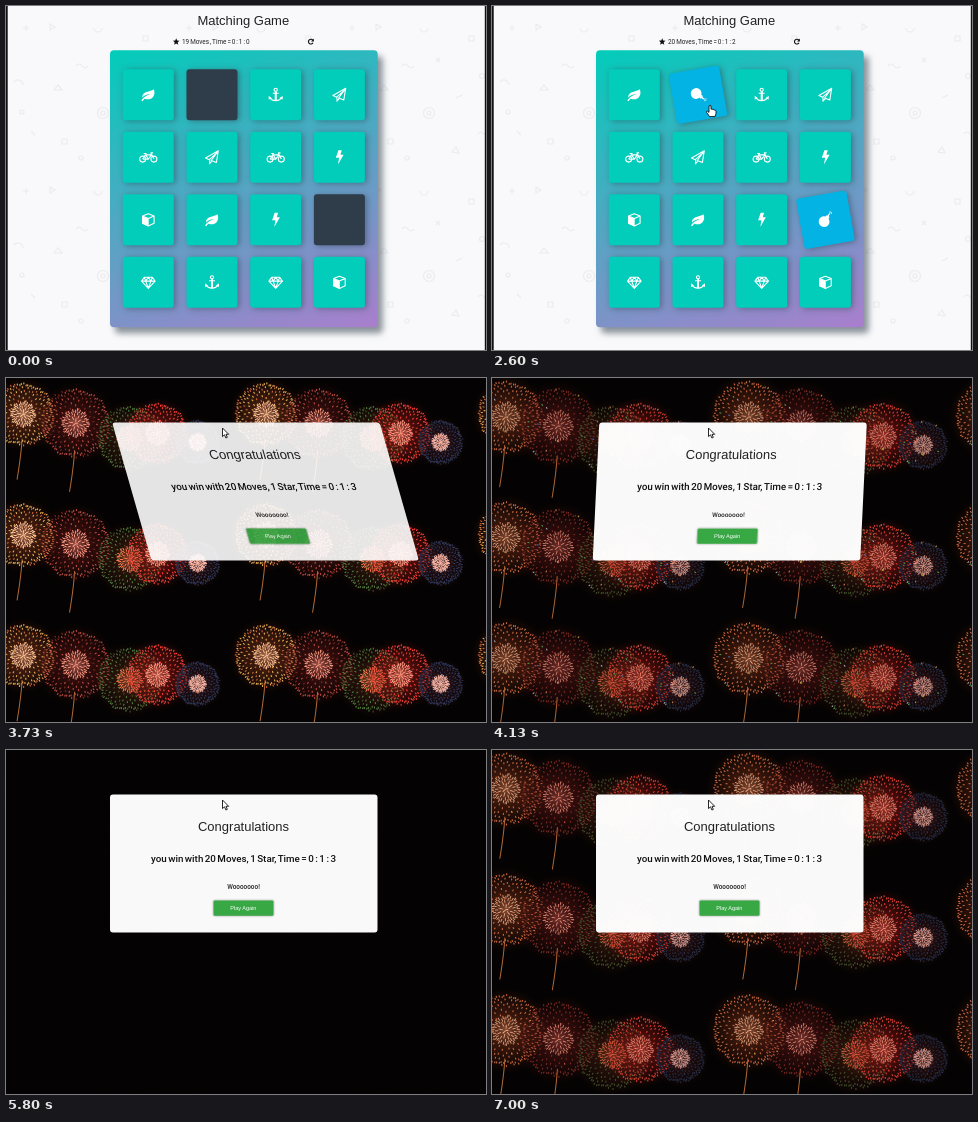
Write an HTML page with a canvas that moves like this. It is 480x344 px and loops after 7.07 s.

```html
<!DOCTYPE html>
<html lang="en">
<head>
<meta charset="utf-8">
<title>Matching Game</title>
<style>
html, body { margin: 0; width: 100%; height: 100%; overflow: hidden; background: #000; }
canvas, svg { position: absolute; left: 0; top: 0; width: 480px; height: 344px; }
.arial { font-family: "Liberation Sans", Arial, sans-serif; }
.ui { font-family: Roboto, sans-serif; word-spacing: -.1em; }
.deck { filter: drop-shadow(5px 6px 3px rgba(46,61,73,.55)); }
.card { filter: drop-shadow(2px 1px 3px rgba(46,61,73,.5)); }
.line { fill: none; stroke: #fff; stroke-width: 1.1; stroke-linejoin: round; }
</style>
</head>
<body>
<canvas id="sky" width="480" height="344"></canvas>
<svg viewBox="0 0 480 344">
  <defs>
    <linearGradient id="deckFill" gradientUnits="userSpaceOnUse" x1="178" y1="18" x2="298" y2="348">
      <stop stop-color="#02ccba"/><stop offset="1" stop-color="#aa7ecd"/>
    </linearGradient>
    <pattern id="paper" width="163" height="163" patternUnits="userSpaceOnUse">
      <rect width="163" height="163" fill="#f9f9fb"/>
      <g fill="none" stroke="#ececf0" stroke-width="1.2">
        <circle cx="97" cy="107" r="5.5"/><circle cx="97" cy="107" r="2"/>
        <path d="M17 22h6m-3-3v6M44 18l5 3-5 3zM8 76a5 5 0 0 1 9 3M48 84l4-5 4 5zM70 60q3-4 6 0t6 0M25 125l4 4M56 133h5v5h-5zM88 22a4 4 0 0 0 8 0M104 52l4 4m0-4l-4 4M124 92l6-3M137 30h5v5h-5zM146 128q3-4 6 0t6 0M120 146l4-5 3 6z"/>
        <circle cx="16" cy="106" r="2"/><circle cx="75" cy="152" r="2"/><circle cx="150" cy="70" r="2.5"/>
      </g>
    </pattern>
  </defs>
  <g id="game">
    <rect width="480" height="344" fill="url(#paper)"/>
    <path d="M0 0H1.7V344H0zM478.8 0H480V344H478.8z" fill="#111"/>
    <text class="arial" x="237.3" y="19.3" font-size="13" text-anchor="middle" fill="#222">Matching Game</text>
    <path id="star" fill="#111"/>
    <text id="status" class="ui" x="176" y="38.2" font-size="6.4" fill="#222"></text>
    <path d="M306.8 34.2A2.4 2.4 0 1 0 307 36.8" fill="none" stroke="#111" stroke-width="1.1"/>
    <path d="M307.9 32.6V35.4H305z" fill="#111"/>
    <rect class="deck" x="104" y="44.3" width="267.7" height="277" rx="4" fill="url(#deckFill)"/>
    <g id="cards"></g>
  </g>
  <g id="modal">
    <rect x="104" y="44.5" width="267.5" height="138" rx="3" fill="#fff" fill-opacity=".975"/>
    <g text-anchor="middle" fill="#222">
      <text class="arial" x="237.5" y="81.3" font-size="13">Congratulations</text>
      <text class="ui" x="237.5" y="111.8" font-size="9.8" font-weight="500" fill="#111">you win with 20 Moves, 1 Star, Time = 0 : 1 : 3</text>
      <text class="ui" x="237.5" y="139" font-size="6.4" font-weight="500">Wooooooo!</text>
      <rect x="207.5" y="150.5" width="60" height="15.3" rx="1" fill="#38a845" style="filter:drop-shadow(0 0 1px #0006)"/>
      <text class="arial" x="237.3" y="160.2" font-size="5.5" fill="#fff">Play Again</text>
    </g>
  </g>
  <g id="cursor" stroke="#111" stroke-width=".9" stroke-linejoin="round" fill="#fff">
    <path id="arrow" d="M0 0V8.6L2 6.8L3.4 10L4.8 9.4L3.5 6.3H6.2z"/>
    <path id="hand" d="M-1 1Q0-.6 1 1V4.2Q2.2 3.6 2.8 4.6Q4 4 4.5 5.1Q6 4.8 6 6.3V8.6L5 11.6H-.4L-3.4 7.4Q-3.8 5.8-2.4 6.2L-1 7.4z"/>
  </g>
</svg>
<script>
const LOOP = 7070, FIRST_CLICK = 1520, SECOND_CLICK = 2200, MATCHED = 3050, WIN = 3270;
const TEAL = '#02ccba', BLUE = '#02b3e4', DARK = '#2e3d49';
const $ = id => document.getElementById(id);
const clamp = (v, lo = 0, hi = 1) => Math.min(hi, Math.max(lo, v));
const mix = (a, b, k) => a + (b - a) * k;

// CSS-like cubic bezier easing
function bezier(x1, y1, x2, y2) {
  const at = (a, b, s) => 3 * a * s * (1 - s) ** 2 + 3 * b * s * s * (1 - s) + s ** 3;
  return x => {
    let lo = 0, hi = 1;
    for (let i = 0; i < 20; i++) {
      const s = (lo + hi) / 2;
      if (at(x1, x2, s) < x) lo = s; else hi = s;
    }
    return at(y1, y2, lo);
  };
}
const ease = bezier(.25, .1, .25, 1), easeOut = bezier(0, 0, .58, 1), easeInOut = bezier(.42, 0, .58, 1);

// Interpolate rows of [time, ...values]
function track(keys, t, easing) {
  if (t <= keys[0][0]) return keys[0].slice(1);
  for (let i = 1; i < keys.length; i++) {
    const [a, b] = [keys[i - 1], keys[i]];
    if (t < b[0]) {
      const k = easing((t - a[0]) / (b[0] - a[0]));
      return a.slice(1).map((v, j) => mix(v, b[j + 1], k));
    }
  }
  return keys[keys.length - 1].slice(1);
}

// ---- Board ----
const solid = d => `<path d="${d}" fill="#fff"/>`;
const line = d => `<path d="${d}" class="line"/>`;
const ICONS = {
  leaf: solid('M-7 5.6Q-4 1 2.5-.8Q-3-.4-6 2.6C-6.5-3.6 2-2.8 5.4-5.6C8 0 4 6.4-3.8 4L-5.8 6.4z'),
  bolt: solid('M-1-7H2.4L1-2.6H4.2L-1.4 7.2L-.3 .5H-3.6z'),
  anchor: '<circle cy="-5" r="1.6" class="line"/>' + line('M-3-1.6H3M0-3.4V6M-5.6 2.4C-4.5 7 4.5 7 5.6 2.4') +
    solid('M-1-3H1V6H-1zM-7 4.6V1L-3.8 3.6zM7 4.6V1L3.8 3.6z'),
  plane: line('M6.3-6.6L-6.5 .7L-2.7 2.4L5-4.6L-.8 3.2L4.4 5.2zM-2.4 2.6V6.4L-.2 3.8'),
  bike: '<circle cx="-5.6" cy="1.8" r="3" class="line"/><circle cx="5.6" cy="1.8" r="3" class="line"/>' +
    line('M-5.6 1.8L-2.8-2.4H3.2L0 1.8H-5.6M-3.2-3.6L0 1.8M5.6 1.8L2.6-4.4H4.8M-4.6-3.8H-1.8'),
  cube: line('M0-6L5.8-3.8V3.4L0 6.2L-5.8 3.4V-3.8zM-5.8-3.8L0-1.2L5.8-3.8') + solid('M-6-3.6L.4-1V6.4L-6 3.6z'),
  gem: line('M-4-5H4L6.8-1.2L0 6L-6.8-1.2zM-6.8-1.2H6.8M-4-5L-2.6-1.2L0 6L2.6-1.2L4-5M-2.6-1.2L0-5L2.6-1.2'),
  bomb: '<circle cx="-1.6" cy="1.6" r="5.4" fill="#fff"/>' + line('M3-2.4Q4-5 5.8-5.4M5.6-7.4V-6.6M7.6-5.4H6.8M7-7L6.6-6.4') +
    solid('M.6-3L2.4-4.4L4.6-2L3-.4z')
};
const LAYOUT = ('leaf bomb anchor plane bike plane bike bolt ' +
  'cube leaf bolt bomb gem anchor gem cube').split(' ');
const cardPos = i => [142.3 + 63.7 * (i % 4), 88.8 + 62.5 * Math.floor(i / 4)];

$('cards').innerHTML = LAYOUT.map((name, i) => {
  const flip = i === 1 ? ' transform="scale(1 -1)"' : '';
  return `<g class="card" transform="translate(${cardPos(i)})"><g>
    <rect x="-25.5" y="-25.5" width="51" height="51" rx="3" fill="${TEAL}"/>
    <g class="icon"${flip}>${ICONS[name]}</g></g></g>`;
}).join('');

$('star').setAttribute('d', 'M' + Array.from({ length: 10 }, (_, i) => {
  const r = i % 2 ? 1.6 : 3.5, a = i * Math.PI / 5;
  return [170.2 + r * Math.sin(a), 35.8 - r * Math.cos(a)].map(v => v.toFixed(2));
}).join('L') + 'z');

const pair = [[1, SECOND_CLICK], [11, FIRST_CLICK]].map(([i, opened]) => {
  const body = $('cards').children[i].firstElementChild;
  return { body, opened, face: body.querySelector('rect'), icon: body.querySelector('.icon') };
});
const SWING = [[0, 0], [.2, 15], [.4, -10], [.6, 5], [.8, -5], [1, 0]];

function drawBoard(t) {
  const seconds = Math.floor((t + 300) / 1000);
  $('status').textContent = `${t < SECOND_CLICK ? 19 : 20} Moves , Time = 0 : 1 : ${seconds}`;
  const [angle] = track(SWING, (t - SECOND_CLICK) / 1000, ease);
  for (const { body, face, icon, opened } of pair) {
    const open = t >= opened;
    face.setAttribute('fill', !open ? DARK : t < MATCHED ? BLUE : TEAL);
    icon.style.display = open ? '' : 'none';
    body.setAttribute('transform', `rotate(${angle})`);
  }
}

// ---- Cursor ----
const PATH = [[90, 484, 350], [800, 388, 262], [1200, 364, 234], [1450, 341, 216], [1600, 341, 216],
  [2120, 218, 99], [2800, 218, 99], [3250, 216.5, 50]];

function drawCursor(t) {
  const [x, y] = track(PATH, t, easeInOut);
  const overCard = t < WIN && LAYOUT.some((_, i) => {
    const [cx, cy] = cardPos(i);
    return Math.abs(x - cx) < 25.5 && Math.abs(y - cy) < 25.5;
  });
  $('cursor').setAttribute('transform', `translate(${x} ${y})`);
  $('hand').style.display = overCard ? '' : 'none';
  $('arrow').style.display = overCard ? 'none' : '';
}

// ---- Win dialog: slides in skewed, then settles ----
const ENTER = [[0, 267.5, -30, 0], [.6, 0, 20, 1], [.8, 0, -5, 1], [1, 0, 0, 1]];

function drawModal(t) {
  const [dx, skew, opacity] = track(ENTER, (t - WIN) / 1000, easeOut);
  const modal = $('modal');
  modal.setAttribute('transform', `translate(${237.5 + dx} 113.5) skewX(${skew}) translate(-237.5 -113.5)`);
  modal.setAttribute('opacity', opacity);
}

// ---- Fireworks ----
const SHOW = 2900, TILE_W = 243, TILE_H = 120.8, PAD = 50;
const BURSTS = [
  { x: 23.5, y: 33, r: 38, lead: 158, fresh: '#e0a850', aged: '#c0623a', core: '#ffc8a0', glow: '#90381a', stem: true },
  { x: 76, y: 42, r: 39, lead: 300, fresh: '#b84a40', aged: '#74261e', core: '#ffa088', glow: '#701a18', stem: true },
  { x: 130, y: 57, r: 36, lead: 300, fresh: '#4c7c3c', aged: '#3c4c26', core: '#ff7c50', glow: '#5c2414' },
  { x: 158, y: 52, r: 34, lead: 300, fresh: '#f83c34', aged: '#cc3a2e', core: '#ffa088', glow: '#b81c18' },
  { x: 198, y: 61, r: 25, lead: 300, fresh: '#2c3658', aged: '#20283e', core: '#ffb8a4', glow: '#501c20' }
];
const EMBERS = ['#c04030', '#b09038', '#4060b0', '#4c9048', '#c07848', '#9a9aa8'];
const noise = n => { const v = Math.sin(n * 127.1 + 3.7) * 43758.5453; return v - Math.floor(v); };

const sky = $('sky').getContext('2d');
const tile = document.createElement('canvas');
tile.width = (TILE_W + 2 * PAD) * 2;
tile.height = 440;
const tc = tile.getContext('2d');

function spokes(radius, count, length, colorOf) {
  for (let i = 0; i < count; i++) {
    // evenly spread points on a sphere, seen from the front
    const z = 1 - (i + .5) / count;
    const d = radius * Math.sqrt(1 - z * z) * mix(.96, 1.04, noise(i));
    const a = i * 2.39996, c = Math.cos(a), s = Math.sin(a), from = Math.max(0, d - length);
    tc.strokeStyle = colorOf(i);
    tc.beginPath();
    tc.moveTo(c * from, s * from);
    tc.lineTo(c * d, s * d);
    tc.stroke();
  }
}

function softDisc(radius, color, alpha) {
  const fill = tc.createRadialGradient(0, 0, 0, 0, 0, radius);
  fill.addColorStop(0, color);
  fill.addColorStop(.45, color + '88');
  fill.addColorStop(1, color + '00');
  tc.globalAlpha = alpha;
  tc.fillStyle = fill;
  tc.beginPath();
  tc.arc(0, 0, radius, 0, 7);
  tc.fill();
}

function drawBurst(b, age) {
  const r = b.r * (1 - Math.exp(-(age + b.lead) / 365));
  const fade = clamp((2550 - age) / 1500) * clamp((age + 60) / 120);
  const late = clamp((age - 830) / 700), young = clamp(1 - age / 600);
  const aging = clamp((age - 250) / 600);
  tc.save();
  tc.translate(b.x - 16 * (1 - Math.exp(-age / 900)), b.y + .007 * age);
  tc.lineCap = 'round';
  softDisc(r * 1.2, b.glow, fade * .6 * (1 - late));

  if (b.stem) {
    tc.globalAlpha = fade * .8 * (1 - late);
    tc.strokeStyle = '#d88040';
    tc.lineWidth = 1;
    tc.beginPath();
    tc.moveTo(-1, r * .8);
    tc.quadraticCurveTo(-2, r + 10, -6, r + 34);
    tc.stroke();
  }

  const sparkColor = i => noise(i + 9) < late ? EMBERS[i % EMBERS.length]
    : noise(i + 40) < aging ? b.aged : b.fresh;
  tc.globalAlpha = fade * .35 * young;
  tc.lineWidth = .7;
  spokes(r, 200, r * .3, sparkColor);
  tc.globalAlpha = fade;
  tc.lineWidth = 1.15;
  spokes(r, 230, 1, sparkColor);

  const coreAlpha = fade * clamp((1350 - age) / 700);
  if (coreAlpha > 0) {
    const coreR = r * .42;
    softDisc(coreR, b.core, coreAlpha * mix(.3, 1, young));
    tc.globalAlpha = coreAlpha;
    tc.lineWidth = .9;
    spokes(coreR, 60, 2.5, () => b.core);
  }
  tc.restore();
}

function drawSky(t) {
  const age = (t - WIN) % SHOW;
  tc.setTransform(1, 0, 0, 1, 0, 0);
  tc.clearRect(0, 0, tile.width, tile.height);
  tc.setTransform(2, 0, 0, 2, PAD * 2, PAD * 2);
  BURSTS.forEach(b => drawBurst(b, age));
  sky.globalCompositeOperation = 'source-over';
  sky.fillStyle = '#040202';
  sky.fillRect(0, 0, 480, 344);
  sky.globalCompositeOperation = 'lighter';
  for (let row = -1; row < 3; row++)
    for (let col = -1; col < 3; col++)
      sky.drawImage(tile, col * TILE_W - PAD, row * TILE_H - PAD, tile.width / 2, tile.height / 2);
}

function render(t) {
  const won = t >= WIN;
  $('game').style.display = won ? 'none' : '';
  $('modal').style.display = won ? '' : 'none';
  if (won) {
    drawSky(t);
    drawModal(t);
  } else drawBoard(t);
  drawCursor(t);
}

const start = performance.now();
function tick() {
  render((performance.now() - start) % LOOP);
  requestAnimationFrame(tick);
}
tick();
</script>
</body>
</html>
```
